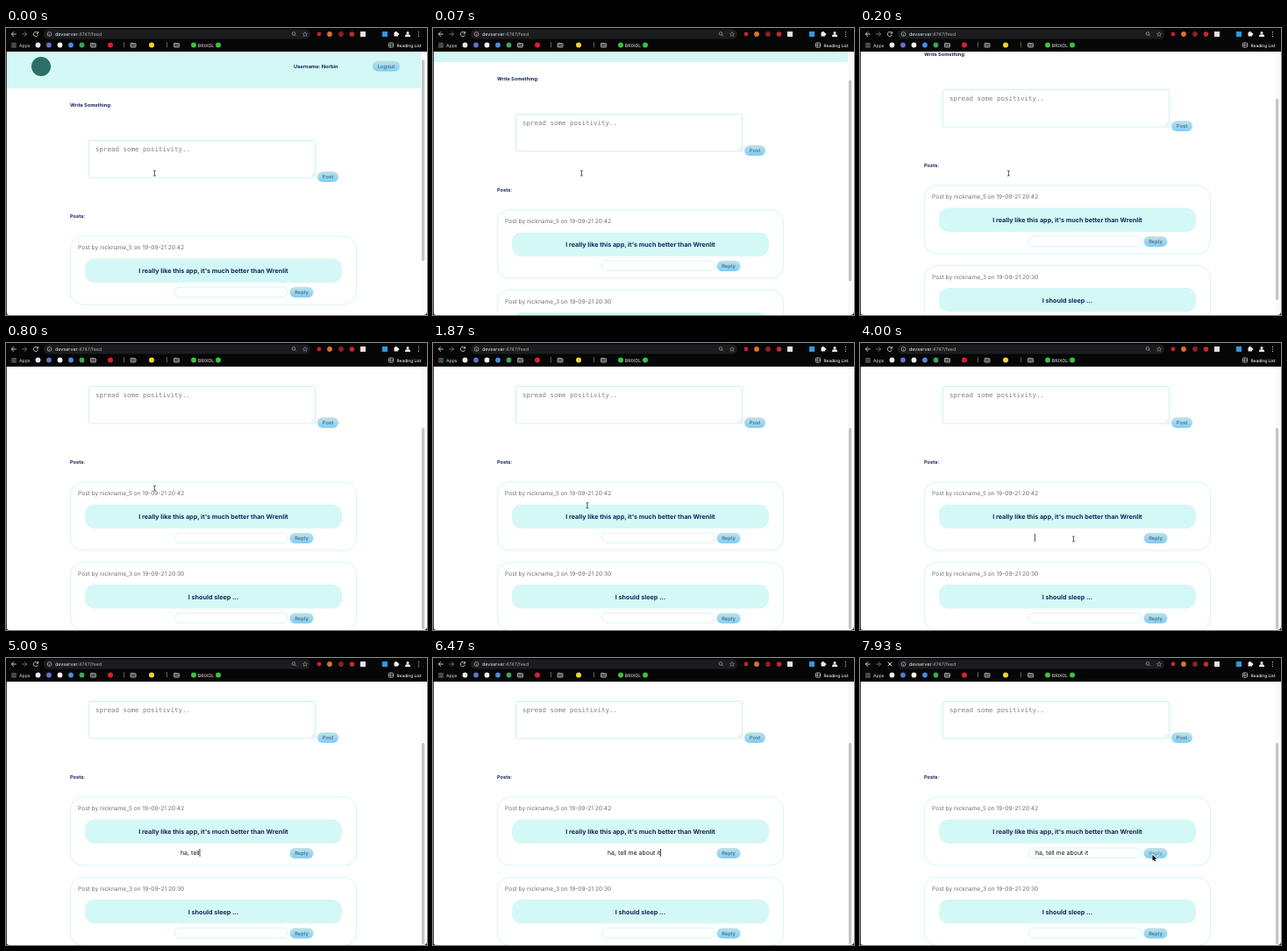
An HTML page with a canvas that plays this animation: 480 px wide and 328 px high, repeating every 8 s.

```html
<!DOCTYPE html>
<html lang="en">
<head>
<meta charset="utf-8">
<style>
  html, body { margin: 0; width: 100%; height: 100%; overflow: hidden; background: #000; }
  canvas { display: block; width: 480px; height: 328px; }
</style>
</head>
<body>
<canvas></canvas>
<script>
const canvas = document.querySelector('canvas');
const ctx = canvas.getContext('2d');
const scale = window.devicePixelRatio || 1;
canvas.width = 480 * scale;
canvas.height = 328 * scale;
ctx.textRendering = 'geometricPrecision';

const LOOP = 8000, SCROLL = 79;
const SANS = 'Inter, sans-serif', MONO = '"DejaVu Sans Mono", monospace';
const NAVY = '#16285a', MINT = '#d4f8f5', EDGE = '#d6f5f5';
const REPLY = 'ha, tell me about it';
const KEY_TIMES = [4070, 4200, 4400, 4600, 4800, 4870, 4930, 5000, 5070,
  5270, 5350, 5430, 5520, 5600, 5680, 5770, 5850, 5930, 6070, 6400];
const FOCUS = 3930, WAKE = 6870, CLICK = 7730, LOADING = 7800;

// Pointer stops: time, x, y
const POINTER = [[930, 169, 166], [2600, 180, 199], [2930, 243, 224],
  [WAKE, 243, 224], [7670, 333.5, 225]];

function box(x, y, w, h, r, fill, stroke) {
  ctx.beginPath();
  ctx.roundRect(x, y, w, h, r);
  if (fill) { ctx.fillStyle = fill; ctx.fill(); }
  if (stroke) { ctx.strokeStyle = stroke; ctx.lineWidth = 1; ctx.stroke(); }
}

function dot(x, y, r, color) {
  ctx.fillStyle = color;
  ctx.beginPath();
  ctx.arc(x, y, r, 0, Math.PI * 2);
  ctx.fill();
}

function line(color, width, ...points) {
  ctx.strokeStyle = color;
  ctx.lineWidth = width;
  ctx.beginPath();
  for (const [x, y] of points) ctx.lineTo(x, y);
  ctx.stroke();
}

function ring(x, y, r, color, from = 0, to = Math.PI * 2) {
  ctx.strokeStyle = color;
  ctx.lineWidth = 0.8;
  ctx.beginPath();
  ctx.arc(x, y, r, from, to);
  ctx.stroke();
}

function text(str, x, y, size, color, weight = 400, align = 'left', family = SANS) {
  ctx.font = `${weight} ${size}px ${family}`;
  ctx.textAlign = align;
  ctx.fillStyle = color;
  ctx.fillText(str, x, y);
}

function button(label, x, y, w, hover) {
  const g = ctx.createLinearGradient(0, y, 0, y + 12);
  g.addColorStop(0, '#bfe3e6');
  g.addColorStop(1, '#7dcdf7');
  box(x, y, w, 12, 6, g);
  text(label, x + w / 2, y + 8.1, 5.8, hover ? '#8497a6' : '#587089', 600, 'center');
}

function card(y, author, time, message, draft, state) {
  box(73.5, y + 0.5, 326, 78, 14, '#fff', EDGE);
  text(`Post by ${author} on ${time}`, 82, y + 15.6, 6.6, '#707070');
  box(90, y + 26, 293, 27.5, 11, MINT);
  text(message, 236.5, y + 42.5, 7.2, NAVY, 700, 'center');
  if (!state.focused) box(192.5, y + 58.5, 128.5, 11.5, 6, '#fff', EDGE);
  const x = state.focused ? 199 : 200;
  text(draft, x, y + 66.8, 6.95, '#111');
  if (state.focused) {
    const end = x + ctx.measureText(draft).width + 0.4;
    line('#000', 0.7, [end, y + 59.5], [end, y + 68.5]);
  }
  button('Reply', 323.5, y + 58.5, 27, state.hover);
}

function page(offset, t, hover) {
  const focused = t >= FOCUS && t < CLICK;
  const draft = REPLY.slice(0, KEY_TIMES.filter(k => k <= t).length);

  ctx.save();
  ctx.beginPath();
  ctx.rect(0, 27, 480, 301);
  ctx.clip();
  ctx.fillStyle = '#fff';
  ctx.fillRect(0, 27, 480, 301);

  ctx.translate(0, -offset);
  ctx.fillStyle = MINT;
  ctx.fillRect(0, 15, 473, 54);
  dot(40, 44, 11, '#2b6f68');
  text('Username: Norbin', 328, 45.6, 5.7, NAVY, 700);
  button('Logout', 418, 37.5, 31);
  text('Write Something:', 73, 90.4, 5.6, NAVY, 700);
  box(94.5, 128.5, 258, 42.5, 1, '#fff', '#cdf1f1');
  text('spread some positivity..', 102, 141.2, 7.47, '#828282', 400, 'left', MONO);
  line('#aaa', 0.5, [348, 169.5], [351, 166.5]);
  line('#aaa', 0.5, [350, 169.5], [351, 168.5]);
  button('Post', 355, 164, 24);
  text('Posts:', 73, 216.8, 5.6, NAVY, 700);
  card(237.5, 'nickname_5', '19-09-21 20:42',
    "I really like this app, it's much better than Wrenlit", draft, { focused, hover });
  card(329, 'nickname_3', '19-09-21 20:30', 'I should sleep ...', '', {});
  ctx.restore();

  ctx.fillStyle = '#fafafa';
  ctx.fillRect(473, 27, 7, 301);
  box(474, 36.2 + offset * 0.77, 3.2, 230, 1.6, '#c4c4c4');
}

function folder(x) {
  box(x - 3, 16.8, 3, 2, 0.5, '#999');
  box(x - 3, 17.6, 6, 4.4, 0.6, '#555', '#999');
}

function toolbar(loading) {
  ctx.fillStyle = '#060606';
  ctx.fillRect(0, 0, 480, 27);
  box(43, 1.5, 304, 11, 5.5, '#1b1c1f');

  const arrow = (x, dir, color) => {
    line(color, 0.9, [x - 2.7, 7], [x + 2.7, 7]);
    line(color, 0.9, [x, 4.3], [x + 2.7 * dir, 7], [x, 9.7]);
  };
  arrow(9, -1, '#ddd');
  arrow(21, 1, '#777');
  if (loading) {
    line('#ddd', 1, [31.7, 4.7], [36.3, 9.3]);
    line('#ddd', 1, [36.3, 4.7], [31.7, 9.3]);
  } else {
    ring(34, 7, 2.6, '#ddd', 0.3, 5.5);
    line('#ddd', 0.9, [36.6, 4], [36.6, 6.2], [34.5, 6.2]);
  }
  ring(49.5, 7, 2.4, '#aaa');
  line('#aaa', 0.8, [49.5, 6.6], [49.5, 8.5]);
  text('devserver', 56, 9, 5.4, '#eee');
  text(':4747/feed', 56 + ctx.measureText('devserver').width, 9, 5.4, '#aaa');

  ring(328, 6.4, 1.8, '#999');
  line('#999', 0.8, [329.3, 7.7], [330.9, 9.3]);
  const star = Array.from({ length: 11 }, (_, i) => {
    const a = i * Math.PI / 5 - Math.PI / 2, r = i % 2 ? 1.3 : 2.7;
    return [341 + r * Math.cos(a), 7.2 + r * Math.sin(a)];
  });
  line('#999', 0.6, ...star);

  dot(357, 7, 2.4, '#c8202c');
  dot(369, 7, 2.9, '#d8742e');
  dot(382, 7, 2.9, '#8d2026');
  dot(394.5, 7, 2.8, '#c8282c');
  box(404, 4, 6, 6, 0, '#f0dede');
  box(429, 4, 6, 6, 0, '#2f9ae0');
  box(442.5, 5, 4.5, 4.5, 0.5, '#eee');
  dot(444.6, 4.9, 1.1, '#eee');
  dot(447.2, 7.2, 1.1, '#eee');
  dot(458, 5.5, 1.5, '#eee');
  box(455, 7.3, 6, 2.7, [2, 2, 0, 0], '#eee');
  for (const y of [4.7, 7, 9.3]) dot(470.5, y, 0.6, '#ddd');

  const colors = ['#e05a4c', '#62b86a', '#5a8de0'];
  for (let i = 0; i < 9; i++) {
    ctx.fillStyle = colors[i % 3];
    ctx.fillRect(6.3 + (i % 3) * 2, 17 + Math.floor(i / 3) * 2, 1.4, 1.4);
  }
  text('Apps', 15, 21.5, 5.1, '#ddd');
  ['#e8e8ee', '#6670c8', '#f2f2f2', '#4a8be8', '#3da45c'].forEach(
    (color, i) => dot(36.5 + i * 12.5, 19.5, 2.9, color));
  [99.5, 145, 194.5].forEach(folder);
  dot(119, 19.5, 3, '#d81e35');
  dot(166, 19.5, 3, '#f5d328');
  text('|', 133.5, 21.3, 5.3, '#ddd');
  text('|', 182.5, 21.3, 5.3, '#ddd');
  dot(214, 19.5, 3, '#35c43f');
  dot(242, 19.5, 3, '#35c43f');
  text('BRIXOL', 228, 21.5, 5.2, '#eee', 400, 'center');
  box(436.5, 17, 5, 5, 0.6, null, '#aaa');
  line('#aaa', 0.7, [436.5, 19.5], [441.5, 19.5]);
  line('#aaa', 0.7, [438.5, 17], [438.5, 22]);
  text('Reading List', 445.5, 21.5, 4.8, '#eee', 500);
}

function pointerAt(t) {
  let [, x, y] = POINTER[0];
  for (let i = 1; i < POINTER.length; i++) {
    const [t0, x0, y0] = POINTER[i - 1], [t1, x1, y1] = POINTER[i];
    if (t < t0) break;
    const p = Math.min(1, (t - t0) / (t1 - t0));
    const ease = p * p * (3 - 2 * p);
    x = x0 + (x1 - x0) * ease;
    y = y0 + (y1 - y0) * ease;
  }
  return { x, y };
}

function pointer({ x, y }) {
  if (x > 321) {
    ctx.beginPath();
    for (const [dx, dy] of [[0, 0], [0, 6.6], [1.5, 5.2], [2.5, 7.5], [3.6, 7], [2.6, 4.8], [4.7, 4.8]])
      ctx.lineTo(x + dx, y + dy);
    ctx.closePath();
    ctx.strokeStyle = '#fff';
    ctx.lineWidth = 1.2;
    ctx.stroke();
    ctx.fillStyle = '#000';
    ctx.fill();
    return;
  }
  const stem = x + 0.4;
  line('#333', 0.8, [stem, y - 3], [stem, y + 3]);
  for (const side of [-1, 1])
    line('#333', 0.7, [stem - 1.6, y + 3.2 * side], [stem, y + 2.6 * side], [stem + 1.6, y + 3.2 * side]);
}

function windowFrame() {
  ctx.fillStyle = '#111';
  ctx.fillRect(0, 27, 0.8, 301);
  ctx.beginPath();
  ctx.rect(0, 320, 480, 8);
  ctx.roundRect(0, 300, 480, 28, [0, 0, 4, 4]);
  ctx.rect(0, 300, 480, 20);
  ctx.fill('evenodd');
}

function draw(now) {
  const t = now % LOOP;
  const offset = t < 70 ? 0 : Math.round(SCROLL * (1 - Math.exp(-t / 150)));
  const mouse = pointerAt(t);
  ctx.setTransform(scale, 0, 0, scale, 0, 0);
  page(offset, t, mouse.x > 323);
  toolbar(t >= LOADING);
  windowFrame();
  if (t < KEY_TIMES[0] || t >= WAKE) pointer(mouse);
  requestAnimationFrame(draw);
}
requestAnimationFrame(draw);
</script>
</body>
</html>
```
